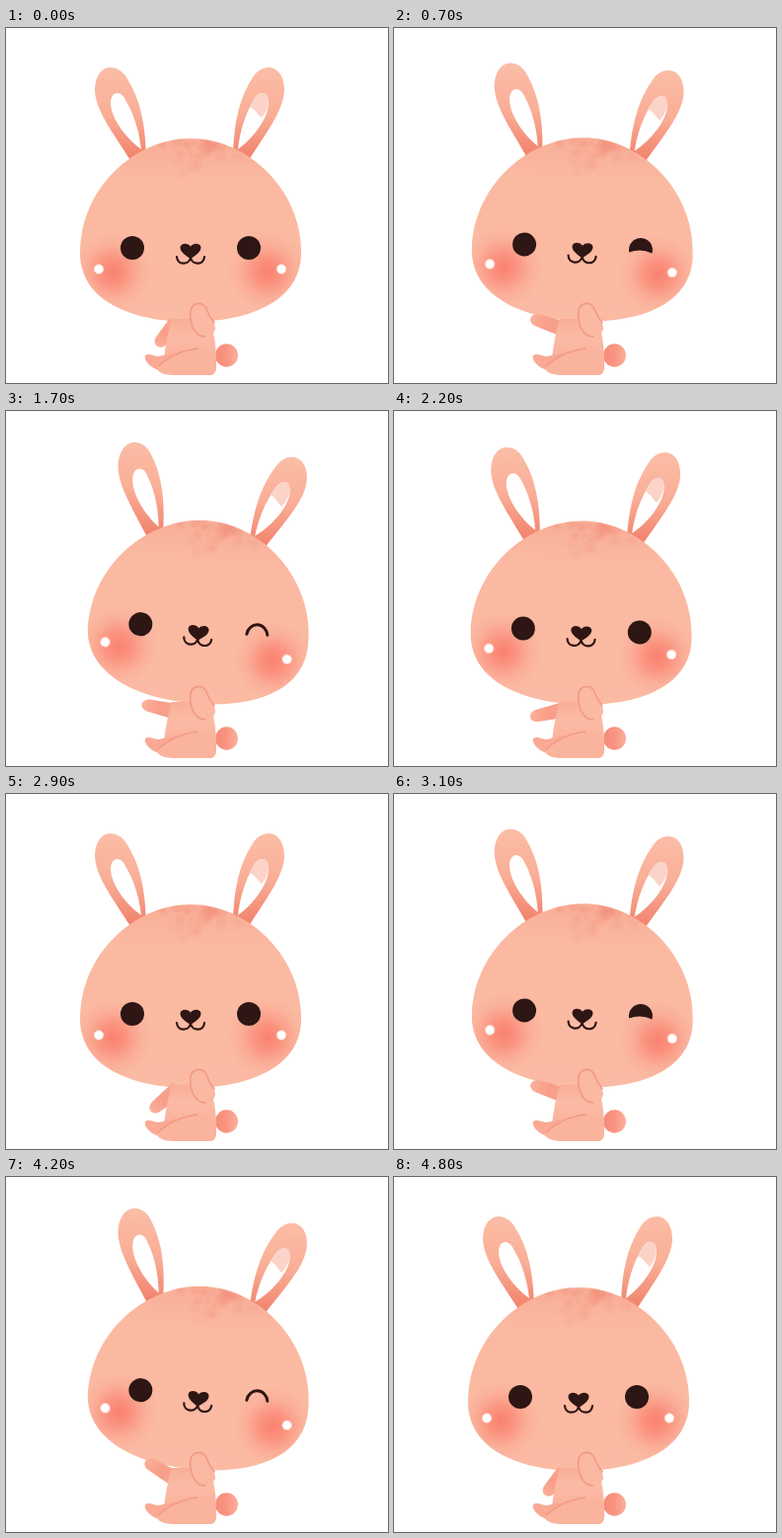
Recreate the animation shown at these times as an HTML page. Size 387 by 360 pixels, loop 5300 ms.

```html
<!DOCTYPE html>
<html lang="en">
<head>
<meta charset="utf-8">
<title>Winking bunny</title>
<style>
  html, body { margin: 0; width: 100%; height: 100%; overflow: hidden; background: #fff; }
  svg { display: block; width: 387px; height: 360px; }
  .line { fill: none; stroke: #f39a84; stroke-width: 1.6; stroke-linecap: round; }
  .dark { fill: #2d1613; }
  .mouth { fill: none; stroke: #2d1613; stroke-width: 2.2; stroke-linecap: round; }
</style>
</head>
<body>
<svg viewBox="0 0 387 360">
  <defs>
    <linearGradient id="fur" x1="0" y1="0" x2="0" y2="1">
      <stop offset="0" stop-color="#fbbda6"/>
      <stop offset=".5" stop-color="#faae97"/>
      <stop offset="1" stop-color="#f1806a"/>
    </linearGradient>
    <linearGradient id="skin" x1="0" y1="0" x2="0" y2="1">
      <stop offset="0" stop-color="#f8ad96"/>
      <stop offset=".22" stop-color="#fbb9a1"/>
      <stop offset="1" stop-color="#fbbaa3"/>
    </linearGradient>
    <linearGradient id="torso" x1="0" y1="0" x2="0" y2="1">
      <stop offset="0" stop-color="#f9ae97"/>
      <stop offset=".3" stop-color="#fbbaa4"/>
      <stop offset="1" stop-color="#faad97"/>
    </linearGradient>
    <linearGradient id="sleeve">
      <stop offset="0" stop-color="#fbb09a"/>
      <stop offset=".5" stop-color="#f89d88"/>
      <stop offset="1" stop-color="#f9a792"/>
    </linearGradient>
    <linearGradient id="tail">
      <stop offset="0" stop-color="#f88a78"/>
      <stop offset=".5" stop-color="#f99482"/>
      <stop offset="1" stop-color="#fbb09c"/>
    </linearGradient>
    <radialGradient id="blush">
      <stop offset="0" stop-color="#fa7666" stop-opacity=".85"/>
      <stop offset=".35" stop-color="#fa7c6b" stop-opacity=".6"/>
      <stop offset=".7" stop-color="#fa8976" stop-opacity=".2"/>
      <stop offset="1" stop-color="#fa9a85" stop-opacity="0"/>
    </radialGradient>
    <filter id="soft" x="-50%" y="-50%" width="200%" height="200%"><feGaussianBlur stdDeviation="1.6"/></filter>
    <path id="face" d="M187 112C243 112 299 162 299 228C299 276 248 298 187 298C126 298 75 276 75 228C75 162 131 112 187 112Z"/>
    <clipPath id="inFace"><use href="#face"/></clipPath>
    <g id="ear">
      <path fill="url(#fur)" d="M126 134C109 107 90 83 90 62C91 35 113 35 122 50C136 72 141 96 142 130Z"/>
      <path fill="#fff" d="M137 123C122 112 106 92 106 75C107 63 117 64 121 73C130 88 135 105 137 123Z"/>
    </g>
  </defs>

  <ellipse cx="223.5" cy="332" rx="11.5" ry="11.8" fill="url(#tail)"/>

  <g id="head">
    <use href="#ear"/>
    <use href="#ear" transform="translate(372 0) scale(-1 1)"/>
    <path fill="#fcd3c8" d="M247 80C251 70 258 63 264 67C268 73 265 84 259 91C255 88 253 83 247 80Z"/>

    <use href="#face" fill="url(#skin)"/>
    <g clip-path="url(#inFace)">
      <g id="spots" fill="#f18671" filter="url(#soft)"></g>
      <circle cx="108" cy="247" r="41" fill="url(#blush)"/>
      <circle cx="265" cy="247" r="41" fill="url(#blush)"/>
    </g>
    <g fill="#fff" stroke="#fdcabd">
      <circle cx="94" cy="244.5" r="4.8"/>
      <circle cx="279" cy="244.5" r="4.8"/>
    </g>

    <circle class="dark" cx="128" cy="223" r="12"/>
    <g transform="translate(246 223)">
      <circle id="open" class="dark" r="12"/>
      <path id="half" class="dark" d="M-11.6 3A12 12 0 1 1 11.6 3Q0 -2 -11.6 3Z"/>
      <path id="shut" class="mouth" style="stroke-width:3" transform="rotate(-3)" d="M-10 -0.5A10.6 11.5 0 0 1 11 -0.5"/>
    </g>
    <path class="dark" d="M187 234C181 230 176.500 227 176.500 222.500C177 218 184 217.500 187 221.500C190 217.500 197 218 197.500 222.500C197.500 227 193 230 187 234Z"/>
    <path class="mouth" d="M173 232C173.500 240.500 185 241 187 233C189 241 200.500 240.500 201 232"/>
  </g>

  <path id="arm" fill="url(#sleeve)" d="M8 -7L-21 -6.500C-33 -7 -34 4.500 -24 6L8 9.500Z"/>

  <path fill="url(#torso)" d="M168 295H206C211 308 213 322 213 343Q213 352 206 352H168L160 335Q162 315 168 295Z"/>
  <path fill="#f9a994" d="M141 332C145 329 150 333 155 333L172 329V345L155 347C148 345 139 338 141 332Z"/>
  <path fill="#fab39d" d="M195 326C177 327 165 333 153 343C152 349 160 352 170 352H206Q213 352 213 343V330Z"/>
  <path class="line" d="M194 325C177 327 165 333 154 343"/>

  <path fill="#fbb8a2" d="M187 289C186 277 201 276 204 286C207 296 212 298 212 305C211 313 198 315 193 309C188 303 187 297 187 289Z"/>
  <path class="line" d="M202 313C198 313 194 311 192 308C187 302 186 291 187 286C190 277 201 277 204 287C206 293 209 296 211 299"/>
</svg>

<script>
  const $ = id => document.getElementById(id);
  const LOOP = 5300, REST = 500, CYCLE = 2400, STEP = 100, LAST = 19;
  const wave = [10, 28, 16];
  const parts = { open: $('open'), half: $('half'), shut: $('shut') };

  function addSpots() {
    let seed = 11;
    const rnd = () => (seed = seed * 16807 % 2147483647) / 2147483647;
    for (let i = 0; i < 30; i++) {
      const spread = rnd() + rnd() - 1, depth = rnd() * rnd();
      const c = document.createElementNS('http://www.w3.org/2000/svg', 'circle');
      c.setAttribute('cx', 197 + spread * 42);
      c.setAttribute('cy', 115 + depth * 46);
      c.setAttribute('r', 2 + rnd() * 4);
      c.setAttribute('opacity', 0.1 + 0.3 * (1 - depth) * rnd());
      $('spots').append(c);
    }
  }

  function armAngle(k) {
    if (k === LAST) return -53;
    const edge = Math.min(k, LAST - 1 - k);
    return edge === 0 ? -42 : edge === 1 ? -15 : wave[k % 3];
  }

  function pose(k) {
    const p = Math.min(1, k / 4, (LAST - k) / 5);
    const tilt = p * p * (3 - 2 * p);
    $('head').setAttribute('transform', `rotate(${5.4 * tilt} 205 308)`);

    const eye = tilt < 0.4 ? 'open' : tilt < 0.7 ? 'half' : 'shut';
    for (const name in parts) parts[name].style.display = name === eye ? '' : 'none';

    const size = k === LAST ? 0.8 : k === 0 || k === LAST - 1 ? 0.92 : 1;
    $('arm').setAttribute('transform', `translate(168 303) rotate(${armAngle(k)}) scale(${size} 1)`);
  }

  function stepAt(t) {
    if (t < REST) return LAST;
    return Math.min(LAST, Math.floor((t - REST) % CYCLE / STEP));
  }

  function tick() {
    pose(stepAt(performance.now() % LOOP));
    requestAnimationFrame(tick);
  }

  addSpots();
  tick();
</script>
</body>
</html>
```
